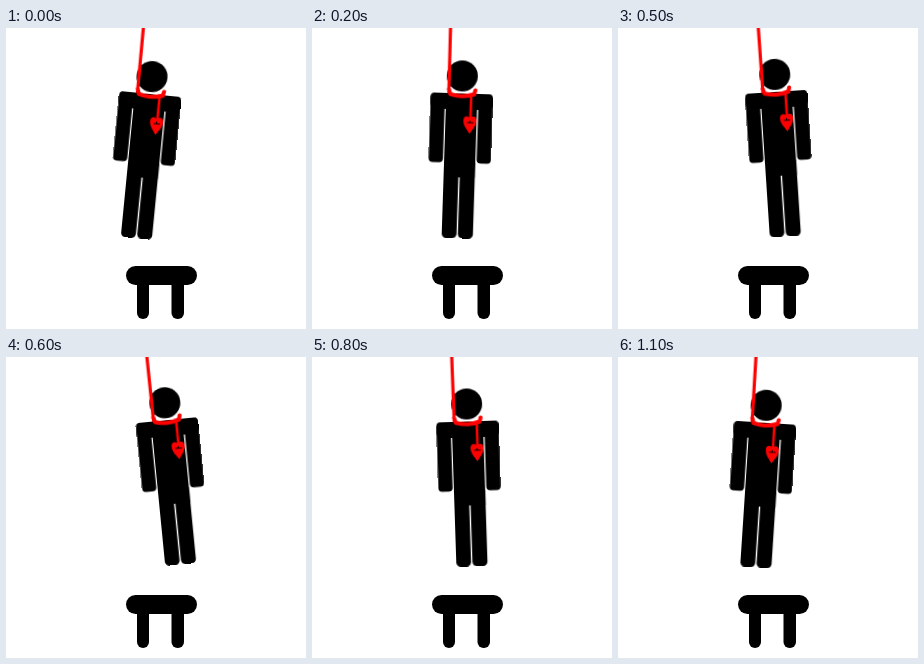
An HTML page that plays this animation: 300 px wide and 301 px high, repeating every 1200 ms.

```html
<!DOCTYPE html>
<html lang="en">
<head>
<meta charset="utf-8">
<title>Swing</title>
<style>
  html, body { margin: 0; width: 100%; height: 100%; overflow: hidden; background: #fff; }
  svg { display: block; width: 300px; height: 301px; }
  .cord { fill: none; stroke: #f00; stroke-linecap: round; stroke-linejoin: round; }

  /* Six hard steps each way between the two extremes */
  #swing {
    transform-origin: 138px -18px;
    animation: swing 1200ms infinite;
    animation-timing-function: steps(6, end);
  }
  @keyframes swing {
    0%, 100% { transform: rotate(5.6deg); }
    50% { transform: rotate(-5.6deg); }
  }
</style>
</head>
<body>
<svg viewBox="0 0 300 301">
  <g id="stool">
    <rect x="120" y="238" width="71" height="19" rx="9.5"/>
    <rect x="131" y="246" width="12" height="45" rx="6"/>
    <rect x="165.5" y="246" width="12.5" height="45" rx="6"/>
  </g>

  <g id="swing">
    <g id="figure">
      <circle cx="152.5" cy="47.5" r="15.5"/>
      <rect x="121.5" y="65" width="62.5" height="16" rx="5"/>
      <rect x="121.5" y="65" width="14.3" height="69.5" rx="4"/>
      <rect x="169.5" y="65" width="14.3" height="69.5" rx="4"/>
      <rect x="137" y="68" width="31.2" height="81"/>
      <rect x="137" y="130" width="14.8" height="80" rx="4.5"/>
      <rect x="153.2" y="130" width="15" height="80" rx="4.5"/>
    </g>

    <g id="rope" class="cord">
      <path d="M139 -24L139.5 64" stroke-width="3.2"/>
      <path d="M139.5 61L141 66Q153 69.5 165 65.5L166 61.5" stroke-width="4"/>
      <path d="M162 67V90" stroke-width="2.6"/>
    </g>

    <g id="pendant">
      <path d="M161.5 89.5C159 86.5 154.8 87.5 155 92C155.2 97.5 158.5 100.5 161.5 105C164.5 100.5 167.8 97.5 168 92C168.2 87.5 164 86.5 161.5 89.5Z" fill="#f00"/>
      <path d="M158.5 94H165M161.5 91.8V94" fill="none" stroke="#000" stroke-width="1"/>
    </g>
  </g>
</svg>
</body>
</html>
```
